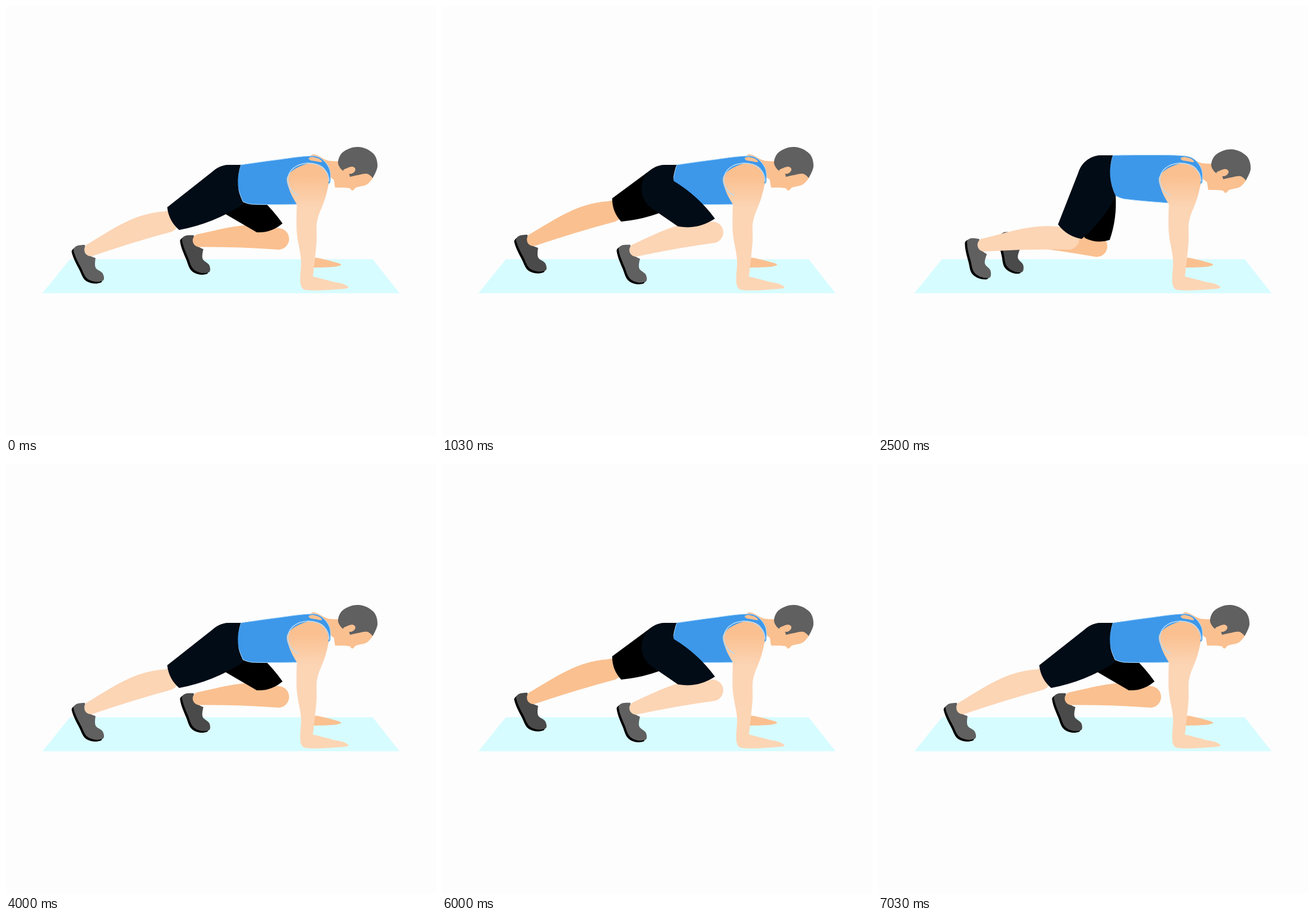
An HTML page with a canvas that plays this animation: 720x720 px, repeating every 8 s.

```html
<!DOCTYPE html>
<html lang="en">
<head>
<meta charset="utf-8">
<title>Mountain climber</title>
<style>
html, body { margin: 0; height: 100%; overflow: hidden; background: #fdfdfd; }
canvas { display: block; width: 100vmin; height: 100vmin; }
</style>
</head>
<body>
<canvas id="stage" width="720" height="720"></canvas>
<script>
const ctx = document.getElementById('stage').getContext('2d');

const C = {
  bg: '#fdfdfd', mat: '#d7fcff', pale: '#fcd5b5', warm: '#fac090',
  hair: '#606060', shirt: '#3d98ea', trim: '#b4dcfa',
  shorts: '#020c16', farShorts: '#000', shoe: '#606060', farShoe: '#4a4a4a'
};

const RISE = 16;      // how far the hips lift while the legs pass
const HIP_R = 40;
const DOWN = Math.PI / 2;

// Leg poses in order: back, passing backwards, passing forwards, front
const pose = (hemBack, hemFront, knee, foot) => ({ hemBack, hemFront, knee, foot });
const near = {
  skin: C.pale, cloth: C.shorts, shoe: C.shoe,
  poses: [
    pose([270, 337], [290, 375], [271, 361], [135, 429]),
    pose([302, 366], [342, 390], [320, 390], [167, 419]),
    pose([342, 378], [387, 391], [367, 400], [217, 417]),
    pose([395, 369], [457, 356], [453, 379], [316, 429])
  ]
};
const far = {
  skin: C.warm, cloth: C.farShorts, shoe: C.farShoe,
  poses: [
    pose([285, 322], [300, 361], [284, 344], [146, 412]),
    pose([302, 363], [345, 378], [322, 383], [170, 410]),
    pose([345, 388], [387, 392], [365, 402], [221, 409]),
    pose([420, 379], [463, 364], [456, 390], [315, 413])
  ]
};
const footTurn = [[0], [0.22], [0.26], [0.08]];
const waist = [[23, 26], [24, 28], [24, 28], [14, -13]];   // front seam from the hip

// "x,y" is a smooth point, "x,y!" a corner
const pts = s => s.trim().split(/\s+/).map(w => {
  const [x, y] = w.replace('!', '').split(',').map(Number);
  return { x, y, corner: w.endsWith('!') };
});

const mat = pts('107,424! 614,424! 659,481! 61,481!');
const shoe = pts('-22,-20 -17,-27 -3,-29! 3,-13 15,-7! 15,9 27,19 27,31 3,29 -9,10');
const shirt = pts('393,266! 387,297 397,328! 412,332 491,332! 520,318 543,295! 542,274 530,257 514,251 450,258');
const farHand = pts('510,421! 523,422 558,431 561,434 545,437 510,438!');
const arm = pts(`505,264 530,269 540,290 535,320 521,360 520,395 514,453! 545,461
  573,470 560,474 500,475 493,464 494,425 487,380 487,332! 475,309 472,284`);
const face = pts(`510,251 540,259 556,260! 600,265 615,287! 604,299 586,304
  580,309 575,305 551,304! 549,291! 530,275`);
const hair = pts(`556,261 565,244 590,236 615,247 622,268 614,288!
  605,281 590,283 576,286! 573,279 562,274`);
const ear = pts('565,276 572,271 580,269 585,273 582,279 575,281');
const nape = pts('507,256 515,253 529,260 519,260');

const armFill = ctx.createLinearGradient(0, 285, 0, 338);
armFill.addColorStop(0, C.warm);
armFill.addColorStop(1, C.pale);

function fill(p, color) {
  const n = p.length;
  const at = i => p[(i + n) % n];
  const handle = (i, len) => {
    if (at(i).corner) return [0, 0];
    const dx = at(i + 1).x - at(i - 1).x, dy = at(i + 1).y - at(i - 1).y;
    const k = len / 3 / Math.hypot(dx, dy);
    return [dx * k, dy * k];
  };
  ctx.beginPath();
  ctx.moveTo(p[0].x, p[0].y);
  for (let i = 0; i < n; i++) {
    const a = at(i), b = at(i + 1);
    const len = Math.hypot(b.x - a.x, b.y - a.y);
    const [ax, ay] = handle(i, len), [bx, by] = handle(i + 1, len);
    ctx.bezierCurveTo(a.x + ax, a.y + ay, b.x - bx, b.y - by, b.x, b.y);
  }
  ctx.fillStyle = color;
  ctx.fill();
}

function outline(width) {
  ctx.strokeStyle = C.trim;
  ctx.lineWidth = width;
  ctx.stroke();
}

// Curve from a to b that swells sideways by a share of its length
function bow([ax, ay], [bx, by], k) {
  ctx.quadraticCurveTo((ax + bx) / 2 - (by - ay) * k, (ay + by) / 2 + (bx - ax) * k, bx, by);
}

function drawShoe([x, y], turn, color) {
  ctx.save();
  ctx.translate(x, y);
  ctx.rotate(turn);
  ctx.translate(-3, 3);
  fill(shoe, '#000');
  ctx.translate(3, -3);
  fill(shoe, color);
  ctx.restore();
}

function drawShank([ax, ay], [kx, ky], color) {
  const len = Math.hypot(kx - ax, ky - ay);
  ctx.save();
  ctx.translate(ax, ay);
  ctx.rotate(Math.atan2(ky - ay, kx - ax));
  ctx.beginPath();
  ctx.arc(0, 0, 11, DOWN, -DOWN);
  ctx.bezierCurveTo(len * 0.35, -20, len * 0.65, -32, len, -18);
  ctx.arc(len, 0, 18, -DOWN, DOWN);
  ctx.quadraticCurveTo(len / 2, 12, 0, 11);
  ctx.fillStyle = color;
  ctx.fill();
  ctx.restore();
}

function drawThigh([hx, hy], back, front, seam, color) {
  const dx = back[0] - hx, dy = back[1] - hy;
  const touch = Math.atan2(dy, dx) + Math.acos(HIP_R / Math.hypot(dx, dy));
  const top = [hx + 19, hy - HIP_R];
  ctx.beginPath();
  ctx.moveTo(...top);
  ctx.arc(hx, hy, HIP_R, -DOWN, touch, true);
  ctx.lineTo(...back);
  bow(back, front, 0.2);
  bow(front, seam, 0.1);
  bow(seam, top, -0.2);
  ctx.fillStyle = color;
  ctx.fill();
}

// Parabola through three poses, the middle one reached at MID
const MID = 0.61;
const weights = e => [
  (e - MID) * (e - 1) / MID,
  e * (1 - e) / (MID * (1 - MID)),
  e * (e - MID) / (1 - MID)
];
const blend = (list, w) => list[0].map((_, i) => list.reduce((sum, v, k) => sum + v[i] * w[k], 0));

function drawLeg(leg, order, w) {
  const part = name => blend(order.map(i => leg.poses[i][name]), w);
  const hip = [374, 306 - RISE * w[1]];
  const foot = part('foot');
  const [turn] = blend(order.map(i => footTurn[i]), w);
  const [sx, sy] = blend(order.map(i => waist[i]), w);
  const c = Math.cos(turn), s = Math.sin(turn);
  const ankle = [foot[0] + 7 * c + 21 * s, foot[1] + 7 * s - 21 * c];
  drawShoe(foot, turn, leg.shoe);
  drawShank(ankle, part('knee'), leg.skin);
  drawThigh(hip, part('hemBack'), part('hemFront'), [hip[0] + sx, hip[1] + sy], leg.cloth);
}

function drawHead(lift) {
  ctx.save();
  ctx.translate(2 * lift, 4 * lift);
  fill(face, C.warm);
  fill(hair, C.hair);
  fill(ear, C.warm);
  ctx.restore();
}

// The shirt rises with the hips and stays put at the shoulder
function drawShirt(lift) {
  fill(shirt.map(p => {
    const share = Math.max(0, (510 - p.x) / 117) * (1 - (p.y - 266) / 200);
    return { ...p, y: p.y - RISE * lift * share };
  }), C.shirt);
  outline(1);
  fill(nape, C.warm);
}

function drawArm() {
  fill(arm, armFill);
  ctx.beginPath();
  ctx.moveTo(489, 317);
  ctx.bezierCurveTo(464, 306, 464, 266, 505, 263);
  ctx.bezierCurveTo(530, 263, 541, 278, 541, 294);
  outline(1.5);
}

const ease = u => u * u * (3 - 2 * u);
const ramp = (t, from, to) => ease(Math.min(1, Math.max(0, (t - from) / (to - from))));

function draw(ms) {
  const t = ms % 4000;
  const forward = t < 1500;   // near leg swings forward, later back
  const w = weights(forward ? ramp(t, 200, 670) : ramp(t, 2270, 2670));
  const ahead = [0, 2, 3], behind = [3, 1, 0];

  ctx.fillStyle = C.bg;
  ctx.fillRect(0, 0, 720, 720);
  fill(mat, C.mat);
  fill(farHand, C.warm);
  drawLeg(far, forward ? behind : ahead, w);
  drawHead(w[1]);
  drawShirt(w[1]);
  drawLeg(near, forward ? ahead : behind, w);
  drawArm();
}

const start = performance.now();
function tick() {
  draw((performance.now() - start) % 8000);
  requestAnimationFrame(tick);
}
tick();
</script>
</body>
</html>
```
